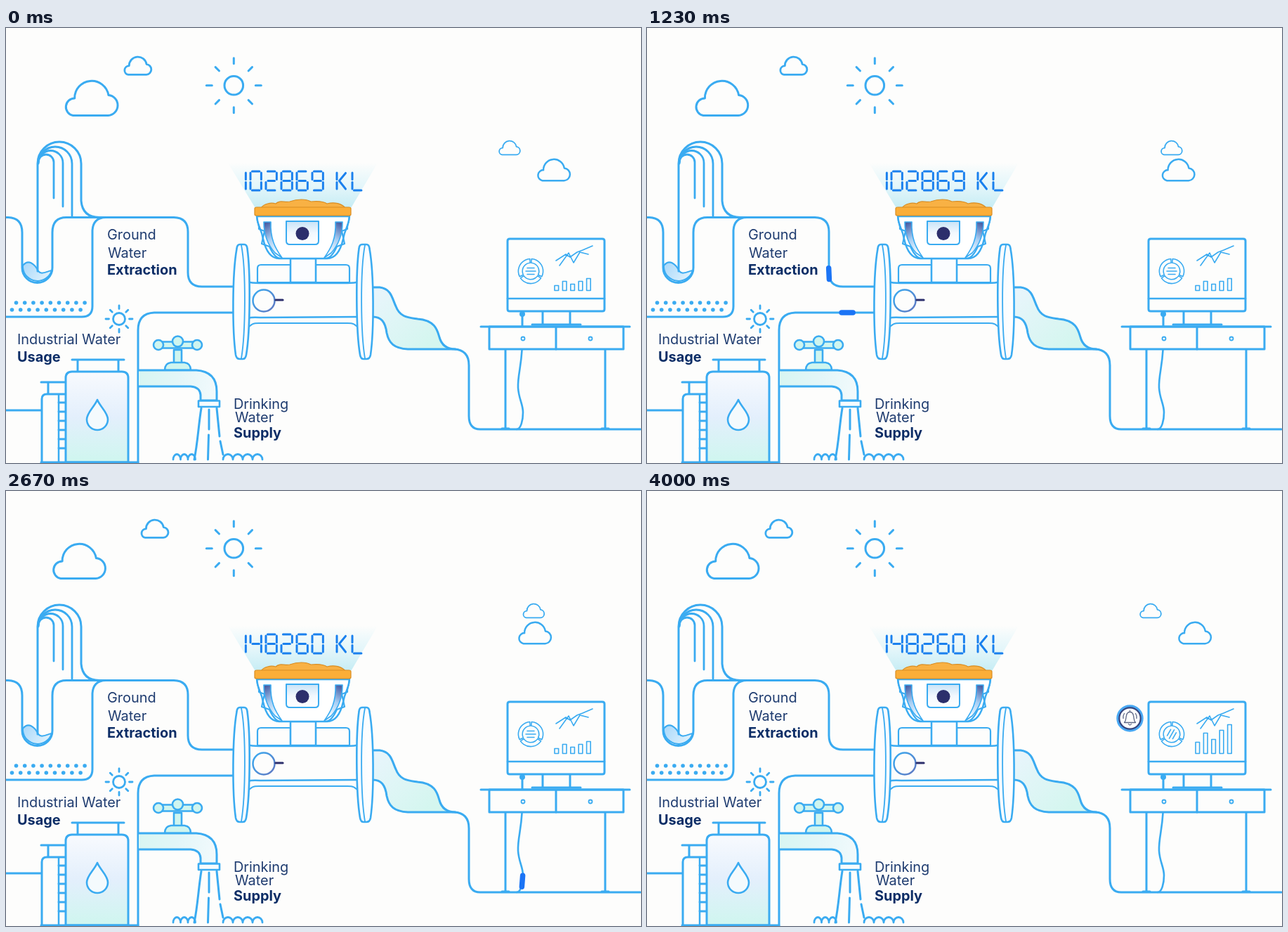
Animation, 904 px wide and 619 px high, one loop 4.03 s. Source, as an HTML page with a canvas:

```html
<!DOCTYPE html>
<html lang="en">
<head>
<meta charset="utf-8">
<title>Water metering</title>
<style>
html, body { margin: 0; width: 100%; height: 100%; overflow: hidden; background: #fdfdfc; }
canvas { display: block; width: 904px; height: 619px; }
</style>
</head>
<body>
<canvas id="stage" width="904" height="619"></canvas>
<script>
const ctx = document.getElementById('stage').getContext('2d');
const LOOP = 4030, STEP = 100 / 3;
const BG = '#fdfdfc', BLUE = '#3aabf1', NAVY = '#2c2f6c', MINT = '#cff5ef';

const clamp = x => Math.max(0, Math.min(1, x));
const smooth = x => { x = clamp(x); return x * x * (3 - 2 * x); };
const span = (t, a, b) => clamp((t - a) / (b - a));

function draw(d, { w = 3, c = BLUE, f } = {}) {
  const p = new Path2D(d);
  if (f) { ctx.fillStyle = f; ctx.fill(p); }
  if (w) { ctx.lineWidth = w; ctx.strokeStyle = c; ctx.stroke(p); }
}
function circle(x, y, r, { w = 3, c = BLUE, f } = {}) {
  ctx.beginPath();
  ctx.arc(x, y, r, 0, 7);
  if (f) { ctx.fillStyle = f; ctx.fill(); }
  if (w) { ctx.lineWidth = w; ctx.strokeStyle = c; ctx.stroke(); }
}
function fade(x0, y0, x1, y1, ...colors) {
  const g = ctx.createLinearGradient(x0, y0, x1, y1);
  colors.forEach((c, i) => g.addColorStop(i / (colors.length - 1), c));
  return g;
}
function at(x, y, fn, sx = 1, sy = sx) {
  ctx.save();
  ctx.translate(x, y);
  ctx.scale(sx, sy);
  fn();
  ctx.restore();
}

// Sky
const CLOUD = 'M12 50A12.6 12.6 0 0 1 14.3 25A24.77 24.77 0 0 1 63.5 20.5A14.8 14.8 0 0 1 63 50Z';
// x, y, scale, line width, drift
const clouds = [
  [83.7, 75.5, 0.98, 3, -23.3], [168, 41.2, 0.505, 2.8, 32],
  [701.5, 160.7, 0.395, 1.8, 45.5], [756.4, 187, 0.605, 2.5, -35.7]
];
function drawClouds(t) {
  const k = t < 2033 ? smooth(t / 2033) : smooth((4000 - t) / 1967);
  for (const [x, y, s, w, dx] of clouds) at(x + dx * k, y, () => draw(CLOUD, { w: w / s }), s);
}
function sun(x, y, r, a, b, w) {
  circle(x, y, r, { w });
  for (let i = 0; i < 8; i++) {
    const u = Math.cos(i * Math.PI / 4), v = Math.sin(i * Math.PI / 4), q = i % 2 ? 0.95 : 1;
    draw(`M${x + u * a * q} ${y + v * a * q}L${x + u * b * q} ${y + v * b * q}`, { w });
  }
}

// Ground, pump and pipes
function drawGround() {
  draw('M24 338C32 328 41 336 46 346C51 352 58 346 65 345A21 21 0 0 1 24 341Z',
    { w: 2, f: fade(24, 335, 60, 362, '#a9d8fa', '#e3f4fd') });
  draw('M0 269.5H3Q23 270 23 291V341A21.5 21.5 0 0 0 66 341V291Q66 269.5 86 269.5H239Q259 270 259 290V348Q259 368 279 368H325');
  draw('M45 346V193A31 31 0 0 1 107 193V246Q109 269.5 133 269.5');
  draw('M46 193A24 24 0 0 1 94 193V269', { w: 2.8 });
  draw('M46 192A17.5 17.5 0 0 1 81 192V254', { w: 2.8 });
  draw('M46 191A11 11 0 0 1 68 191V242', { w: 2.8 });
  draw('M0 411H108Q123 411 123 396V288Q124 270 142 269.5');
  for (let i = 0; i < 9; i++) {
    circle(14.5 + i * 12.2, 391, 2.8, { w: 0, f: BLUE });
    circle(8.5 + i * 12.2, 401, 2.8, { w: 0, f: BLUE });
  }
  draw('M325 405H211Q188 406 188 430V618');
}
function drawTanks() {
  draw('M0 544H50M50 504H84M60 504V521M51 618V528Q51 521 58 521H85');
  draw('M75 522V618', { w: 2.5 });
  for (let y = 533; y < 610; y += 13) draw(`M75 ${y}H85`, { w: 2.8 });
  draw('M94 472H168M102 472V489M160 472V489');
  draw('M85 618V498Q85 489 94 489H165Q174 489 174 498V618Z',
    { f: fade(0, 489, 0, 618, '#f8fafe', '#e3effc', '#cff6ef') });
  draw('M130 529C134 539 145 547 145 557A15 15 0 0 1 115 557C115 547 126 539 130 529Z', { w: 2.6, f: '#f4fafd' });
  draw('M50 618H188');
}
function drawTap() {
  const f = MINT;
  draw('M239 458H250V478H239Z', { w: 2.6, f });
  draw('M217 446.5H272V455.5H217Z', { w: 2.6, f });
  circle(217, 451, 7, { w: 2.6, f });
  circle(272, 451, 7, { w: 2.6, f });
  circle(244.5, 446, 7.5, { w: 2.6, f });
  draw('M226 487Q226 477 235 476H254Q263 477 263 487Z', { w: 2.6, f });
  const pipe = 'M189 487H271Q300 489 300 517V530H277V522Q276 511 263 510H189';
  draw(pipe, { f: fade(189, 500, 300, 520, '#d8f6f2', '#e3f6f8', '#f2fafc') });
  draw('M274 530.5H304V539H274Z', { w: 2.6, f: '#f6fbfd' });
  draw('M278 541C274 565 273 590 268 614M289 543V571M288.5 579L287.5 614M300 541L304 581M305 588L309 607');
  const bumps = (x, n, step) => {
    let d = `M${x} 614`;
    for (let i = 1; i <= n; i++) d += `A${step / 2} 7.5 0 0 1 ${x + i * step} 614`;
    draw(d, { w: 2.8 });
  };
  bumps(238, 3, 10.5);
  bumps(309, 4, 14);
}
function drawStream() {
  const top = 'M522 369H532C549 371 550 386 555 396C561 412 573 412 586 414C611 416 614 430 617 440C620 451 628 457 640 457';
  draw(top + 'H572C552 456 545 448 542 434C540 418 534 411 522 411Z',
    { w: 0, f: fade(522, 370, 600, 455, '#e9f5fc', '#d4f6ef') });
  draw(top);
  draw('M522 411C534 411 540 418 542 434C545 448 552 456 572 457H638Q659 458 659 480V552Q659 571 675 571H903');
  draw('M735 404V428C737 475 728 490 729 512C730 528 736 535 736 547C736 558 733 571 727 571', { w: 2.6 });
}

// Travelling pulses: path, start, end
const legs = [
  ['M45 340V193A31 31 0 0 1 107 193V246Q109 270 133 270H155', 67, 833],
  ['M155 270H239Q259 270 259 290V348Q259 368 279 368H336', 833, 1433],
  ['M188 617V437Q188 428 190 420', 67, 833],
  ['M190 420Q195 405 211 405H336', 833, 1433],
  ['M512 411H522C534 411 540 418 542 434C545 448 552 456 572 457H637Q645 457 649.5 460', 1867, 2233],
  ['M649.5 460Q659 466 659 480V552Q659 571 675 571H727Q734 571 735 555', 2233, 2667],
  ['M735 555C737 535 730 528 729 512C728 490 737 475 735 440V410', 2667, 3000]
].map(([d, a, b]) => {
  const path = document.createElementNS('http://www.w3.org/2000/svg', 'path');
  path.setAttribute('d', d);
  return { path, a, b, len: path.getTotalLength() };
});
function drawPulses(t) {
  for (const { path, a, b, len } of legs) {
    if (t < a || t >= b) continue;
    const s = len * (t - a) / (b - a);
    const p = path.getPointAtLength(s);
    const q = path.getPointAtLength(Math.max(0, s - 2)), r = path.getPointAtLength(s + 2);
    const n = Math.hypot(r.x - q.x, r.y - q.y) || 1;
    const u = (r.x - q.x) / n * 8, v = (r.y - q.y) / n * 8;
    draw(`M${p.x - u} ${p.y - v}L${p.x + u} ${p.y + v}`, { w: 7.5, c: '#1b74f5' });
  }
}

// Seven-segment display
const SEG = {
  a: 'M2.5 0H13.5', b: 'M16 2V11.5', c: 'M16 15.5V25', d: 'M2.5 27H13.5',
  e: 'M0 15.5V25', f: 'M0 2V11.5', g: 'M3 13.5H13', k: 'M3.5 13.5L13 2.5M3.5 13.5L13 25'
};
const DIGIT = ['abcdef', 'bc', 'abged', 'abgcd', 'fgbc', 'afgcd', 'afgedc', 'abc', 'abcdefg', 'abcdfg'];
const glyph = (x, segs) => at(x, 204, () => [...segs].forEach(s => draw(SEG[s], { w: 3.1, c: '#1a80ee' })), 0.96, 1);
function drawReadout(t) {
  draw('M316 192H529L490 258H356Z', { w: 0, f: fade(0, 192, 0, 258, 'rgba(222,245,250,0)', '#e4f6fa', '#c4ecf4') });
  const value = 102869 + Math.floor(45391 * clamp((t - 43 * STEP) / 400.4));
  [...String(value)].forEach((n, i) => glyph(326 + i * 22, DIGIT[n]));
  glyph(471, 'efk');
  glyph(493, 'efd');
}

// Meter
function flange() {
  draw('M333 308Q329 308 328.5 314C322 350 322 430 327 465Q328 471 333 471H337Q341 471 342 465C348 430 348 345 343.5 314Q343 308 339 308Z',
    { w: 2.6, f: fade(324, 0, 347, 0, '#ffffff', '#f5fafe') });
  draw('M335 309C342 345 341 435 335 470', { w: 1.8 });
}
function strut() {
  draw('M357 268C358 280 361 281 360 286L368 289L364 307L375 311C380 322 386 328 391 328', { w: 2.2 });
  draw('M367 276H377C376 300 383 313 393 327L383 320C373 309 367 294 367 276Z',
    { w: 1.6, f: fade(367, 280, 389, 318, '#4a60a6', '#a5cdf3', '#f3faff') });
}
function mirrored(fn) {
  fn();
  at(846, 0, fn, -1, 1);
}
function drawMeter() {
  const w = 2.5;
  draw('M358 362V342Q358 337 363 337H405V362ZM441 337H484Q489 337 489 342V362H441Z', { w: 2.2, f: BG });
  draw('M405 328H441V362H405Z', { w, f: '#fbfdff' });
  draw('M342 361Q350 363 360 363H486Q496 363 504 361V412H342Z', { w: 0, f: BG });
  draw('M342 361Q350 363 360 363H486Q496 363 504 361M344 413Q350 411 362 412L502 411', { w });
  draw('M344 428C349 421 352 420 360 420H486C494 420 497 421 502 428', { w: 2 });
  mirrored(flange);
  circle(367, 388, 15.5, { w: 2.5, c: fade(351, 375, 382, 402, BLUE, '#5f78c2') });
  draw('M384 387H394', { w: 3.2, c: NAVY });

  draw('M357 268H489C488 282 483 284 480 300C476 318 468 328 457 328H389C378 328 370 318 366 300C363 284 358 282 357 268Z', { w, f: '#fff' });
  mirrored(strut);
  draw('M399 275H445V303Q445 308 440 308H404Q399 308 399 303Z', { w: 2, f: fade(0, 275, 0, 308, '#c7e3f7', '#f2f8fe', '#fff') });
  circle(422, 292.5, 9.5, { w: 0, f: NAVY });
  draw('M363 256C367 250 377 248 384 250C390 244 397 249 404 247C415 243 427 243 434 247C444 246 451 246 457 250C468 247 478 250 483 256Z',
    { w: 1.2, c: '#d98d22', f: '#f8b144' });
  draw('M354 257Q354 255 357 255H488Q491 255 491 257V265Q491 267 488 267H357Q354 267 354 265Z',
    { w: 1.2, c: '#d98d22', f: '#fbae38' });
}

// Desk and monitor
function drawDesk() {
  draw('M711 458V570M853 458V570M706 570H716M848 570H858');
  draw('M688 425H879V457H688Z', { f: BG });
  draw('M676 425H888M783 426V457');
  for (const x of [736, 832]) circle(x, 442, 2.5, { w: 1.8 });
  draw('M764 404V422M803 404V422M749 422H818');
  circle(735, 407, 4, { w: 0, f: BLUE });
  draw('M735 408V424', { w: 2.6 });
  draw('M717 300H849Q852 300 852 303V400Q852 403 849 403H717Q714 403 714 400V303Q714 300 717 300Z', { f: BG });
  draw('M714 385H852', { w: 2.6 });
}
function drawScreen(t) {
  const k = smooth(span(t, 2900, 3834)), w = 1.6;
  ctx.save();
  ctx.translate(747, 346);
  ctx.rotate(k * Math.PI * 2 / 3);
  for (let i = 0; i < 3; i++) {
    const a = -Math.PI / 2 + i * Math.PI * 2 / 3 + 0.07, b = a + Math.PI * 2 / 3 - 0.14;
    ctx.beginPath();
    ctx.arc(0, 0, 17.6, a, b);
    ctx.arc(0, 0, 11.8, b, a, true);
    ctx.closePath();
    ctx.lineWidth = w;
    ctx.strokeStyle = BLUE;
    ctx.stroke();
  }
  draw('M-5 -4.5H5M-7 0H7M-5 4.5H5', { w });
  ctx.restore();
  draw('M783 331L797 322L803 326L813 319L821 316L835 310M788 338L801 320L808 334L817 319L829 322', { w });
  [[7, 16], [13, 29], [9, 20], [13, 33], [17, 41]].forEach(([lo, hi], i) => {
    const h = lo + (hi - lo) * k;
    draw(`M${781 + i * 11.4} 373.5v${-h}h5.6v${h}Z`, { w });
  });
}
function drawBell(t) {
  const k = smooth(span(t, 2967, 3134));
  if (!k) return;
  at(687.5, 323.5, () => {
    circle(0, 0, 17.2, { w: 4, c: '#48a8f3', f: '#fff' });
    circle(0, 0, 15.2, { w: 2.2, c: '#35457f' });
    const c = '#5c6684', w = 1.3;
    draw('M-8 6C-5 3 -6 -1 -5 -4Q-4 -9 0 -9Q4 -9 5 -4C6 -1 5 3 8 6ZM-2 8Q0 11 2 8M0 -9V-11', { w, c });
    draw('M-8 -7Q-10 -4 -9.5 0M8 -7Q10 -4 9.5 0', { w, c });
  }, k);
}

const labels = [
  ['Ground', 144, 301], ['Water', 145, 327], ['Extraction', 144, 351, 1],
  ['Industrial Water', 16, 450], ['Usage', 16, 475, 1],
  ['Drinking', 324, 542], ['Water', 326, 561], ['Supply', 324, 583, 1]
];
function drawLabels() {
  for (const [text, x, y, bold] of labels) {
    ctx.font = `${bold ? 700 : 400} 19.9px Inter, "Open Sans", sans-serif`;
    ctx.fillStyle = bold ? '#0c2d66' : '#1f3c70';
    ctx.fillText(text, x, y);
  }
}

function render(t) {
  ctx.fillStyle = BG;
  ctx.fillRect(0, 0, 904, 619);
  ctx.lineCap = ctx.lineJoin = 'round';
  drawClouds(t);
  sun(324.3, 81.8, 13.3, 31, 39, 3);
  sun(161, 414, 8.5, 14.5, 19, 2.8);
  drawGround();
  drawTanks();
  drawTap();
  drawStream();
  drawPulses(t);
  drawReadout(t);
  drawMeter();
  drawDesk();
  drawScreen(t);
  drawBell(t);
  drawLabels();
}

const start = performance.now();
function tick() {
  const t = (performance.now() - start) % LOOP;
  render(Math.min(120, Math.floor((t + 5) / STEP)) * STEP);
  requestAnimationFrame(tick);
}
tick();
</script>
</body>
</html>
```
